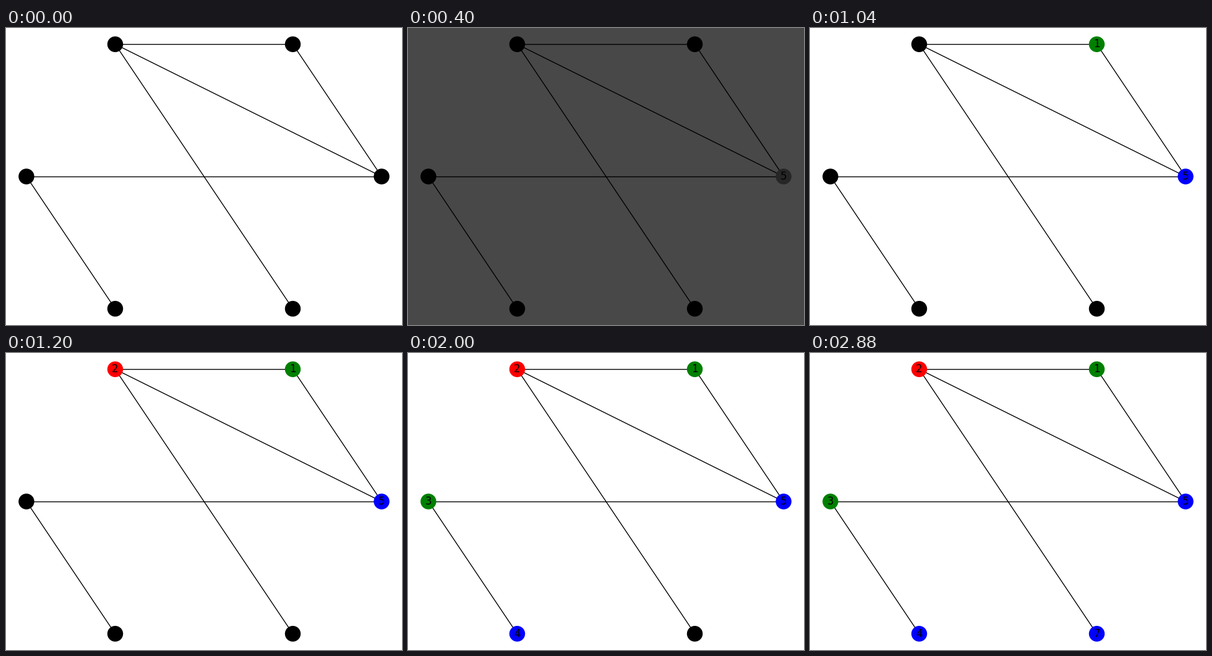
Animation of 640x480 px, one loop 3200 ms. Source, as a matplotlib script:

```python
import math

import matplotlib.pyplot as plt
from matplotlib.animation import FuncAnimation
from matplotlib.collections import LineCollection

W, H, DPI = 640, 480, 100
STEP_MS, STEPS = 400, 8
NODE_SIZE = 300
PALETTE = ["blue", "green", "red"]
DIM_PAGE, DIM_NODE = "#484848", "#262626"

NAMES = "512347"  # counter-clockwise from the right, also the visiting order
EDGES = ["21", "15", "25", "27", "35", "34"]


def circle_layout(names):
    turn = 2 * math.pi / len(names)
    return {n: (math.cos(i * turn), math.sin(i * turn))
            for i, n in enumerate(names)}


def greedy_colors(names, edges):
    """Give each node the first colour no coloured neighbour has."""
    colors = {}
    for n in names:
        near = {m for e in edges if n in e for m in e if m != n}
        used = {colors.get(m) for m in near}
        colors[n] = next(c for c in PALETTE if c not in used)
    return colors


pos = circle_layout(NAMES)
colors = greedy_colors(NAMES, EDGES)

plt.rcParams["font.family"] = "DejaVu Sans"
fig = plt.figure(figsize=(W / DPI, H / DPI), dpi=DPI, facecolor="white")
ax = fig.add_axes([0, 0, 1, 1])
ax.axis("off")

# Room for a node's radius at the rim, then a 5 % margin on each side.
radius = math.sqrt(NODE_SIZE) / 2
xlim = 1.1 * (1 + radius / W)
ylim = 1.1 * (math.sin(math.pi / 3) + radius / H)
ax.set_xlim(-xlim, xlim)
ax.set_ylim(-ylim, ylim)

ax.add_collection(LineCollection([(pos[a], pos[b]) for a, b in EDGES],
                                 colors="black", linewidths=1, zorder=1),
                  autolim=False)
nodes = ax.scatter(*zip(*pos.values()), s=NODE_SIZE, c="black",
                   linewidths=1, zorder=2)
labels = [ax.text(*pos[n], n, size=12, color="black",
                  ha="center", va="center", zorder=3) for n in NAMES]


def draw(step):
    """Colour one more node per step; the first colouring is dimmed to grey."""
    dim = step == 1
    fig.set_facecolor(DIM_PAGE if dim else "white")
    fills = ["black"] * len(NAMES)
    for i, n in enumerate(NAMES):
        labels[i].set_visible(i < step)
        if i < step:
            fills[i] = DIM_NODE if dim else colors[n]
    nodes.set_facecolor(fills)
    nodes.set_edgecolor(fills)
    return [nodes, *labels]


anim = FuncAnimation(fig, draw, frames=STEPS, interval=STEP_MS,
                     init_func=lambda: draw(0), repeat=True,
                     repeat_delay=0, blit=False)
plt.show()
```
